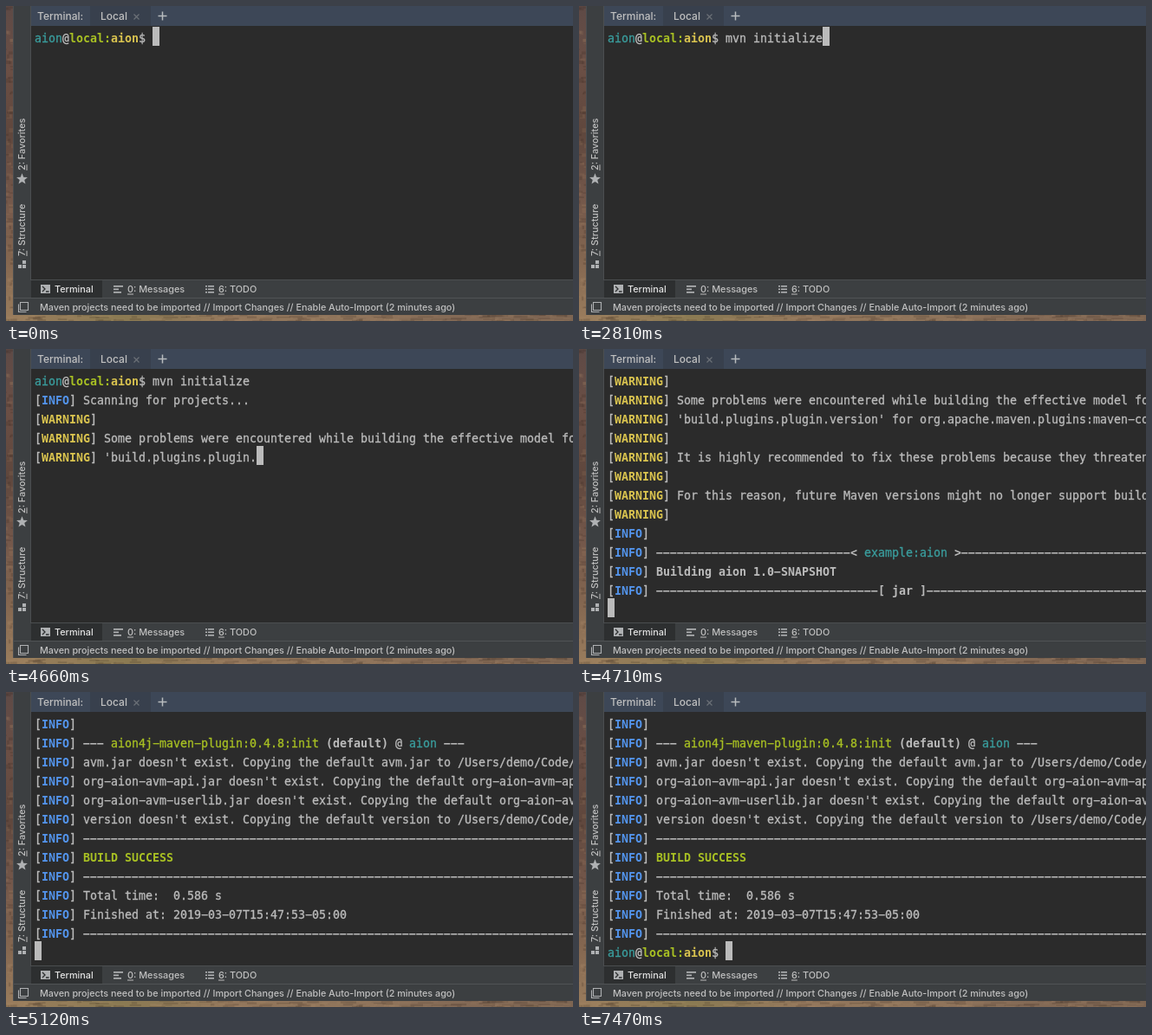
An HTML page with a canvas that plays this animation: 654 by 364 pixels, repeating every 7.57 s.

```html
<!DOCTYPE html>
<html lang="en">
<head>
<meta charset="utf-8">
<title>Terminal session</title>
<style>
html, body { margin: 0; width: 100%; height: 100%; overflow: hidden; background: #2b2b2b; }
canvas { display: block; }
</style>
</head>
<body>
<canvas id="stage" width="654" height="364"></canvas>
<script>
const W = 654, H = 364, LOOP = 7570;
const CELL = 8, ROW = 22, LEFT = 33, TOP = 24, ROWS = 13;
const UI = 'Inter, sans-serif';
const MONO = '13.29px "DejaVu Sans Mono", monospace';

// "~x" inside a line switches to style x: [colour, bold]
const STYLES = {
  n: ['#bbbbbb', false],
  s: ['#bbbbbb', true],
  t: ['#3a9d9d', false],
  g: ['#a8c023', false],
  G: ['#a8c023', true],
  y: ['#d9c34f', true],
  b: ['#5394ec', true]
};

const PROMPT = '~taion~s@~Glocal:~yaion~n$ ';
const COMMAND = PROMPT + 'mvn initialize';
const info = (text = '') => `[~bINFO~n] ${text}`;
const warn = (text = '') => `[~yWARNING~n] ${text}`;
const dashes = n => '-'.repeat(n);
const missing = (file, to = '/Users/demo/Code/') =>
  info(`${file} doesn't exist. Copying the default ${file} to ${to}`);

const LOG = [
  COMMAND,
  info('Scanning for projects...'),
  warn(),
  warn('Some problems were encountered while building the effective model for example:aion'),
  warn("'build.plugins.plugin.version' for org.apache.maven.plugins:maven-compiler-plugin"),
  warn(),
  warn('It is highly recommended to fix these problems because they threaten the stability'),
  warn(),
  warn('For this reason, future Maven versions might no longer support building such'),
  warn(),
  info(),
  info(`~s${dashes(28)}< ~texample:aion~s >${dashes(28)}`),
  info('~sBuilding aion 1.0-SNAPSHOT'),
  info(`~s${dashes(32)}[ jar ]${dashes(33)}`),
  info(),
  info('~s--- ~gaion4j-maven-plugin:0.4.8:init~s (default)~n @ ~taion~s ---'),
  missing('avm.jar'),
  missing('org-aion-avm-api.jar'),
  missing('org-aion-avm-userlib.jar'),
  missing('version'),
  info('~s' + dashes(72)),
  info('~GBUILD SUCCESS'),
  info('~s' + dashes(72)),
  info('Total time:  0.586 s'),
  info('Finished at: 2019-03-07T15:47:53-05:00'),
  info('~s' + dashes(72))
];

// Each screen: start time, finished log lines, text on the cursor line
const SCREENS = [
  [0, 0, PROMPT],
  [1790, 0, COMMAND],
  [3080, 1, ''],
  [4570, 2, ''],
  [4660, 4, warn("'build.plugins.plugin.")],
  [4680, 10, ''],
  [4710, 14, ''],
  [5010, 17, ''],
  [5060, 19, ''],
  [5120, 26, ''],
  [5150, 26, PROMPT]
];
const CURSOR_OFF = [[60, 530], [1040, 1550], [2300, 2810], [3580, 4120], [5620, 6160], [6630, 7170]];

const ctx = document.getElementById('stage').getContext('2d');
const frame = document.createElement('canvas');
frame.width = W;
frame.height = H;
drawWindow(frame.getContext('2d'));

function drawWindow(g) {
  const rect = (x, y, w, h, color) => {
    g.fillStyle = color;
    g.fillRect(x, y, w, h);
  };
  const label = (text, x, y, size, color = '#c0c0c0') => {
    g.font = `500 ${size}px ${UI}`;
    g.fillStyle = color;
    g.fillText(text, x, y);
  };
  const mnemonic = (text, x, y) => {
    label(text, x, y, 10.85);
    rect(x, y + 1.5, g.measureText(text[0]).width, 1, '#bbbbbb');
  };
  const stroke = (color, width, ...lines) => {
    g.strokeStyle = color;
    g.lineWidth = width;
    g.beginPath();
    for (const [x, y, ...rest] of lines) {
      g.moveTo(x, y);
      for (let i = 0; i < rest.length; i += 2) g.lineTo(rest[i], rest[i + 1]);
    }
    g.stroke();
  };

  drawDesktop(g, rect);

  // Panels
  rect(8, 0, W - 8, 357, '#3c3f41');
  rect(8, 0, 1, 357, '#4b4e50');
  rect(28, 0, 1, 317, '#4b4e50');
  rect(29, 0, W - 29, 23, '#3d4757');
  rect(97, 0, 70, 23, '#38404d');
  rect(29, 23, W - 29, 294, '#2b2b2b');
  rect(29, 316, W - 29, 1, '#4b4e50');
  rect(29, 317, 82, 20, '#2d2f30');
  rect(9, 337, W - 9, 1, '#505355');

  // Header
  label('Terminal:', 36, 16, 12);
  label('Local', 109, 16, 12);
  stroke('#6d7279', 1.1, [147.5, 9.5, 153.5, 15.5], [153.5, 9.5, 147.5, 15.5]);
  stroke('#b8bbbe', 1.5, [175.5, 11.5, 185.5, 11.5], [180.5, 6.5, 180.5, 16.5]);

  // Side bar
  for (const [text, y] of [['2: Favorites', 190], ['7: Structure', 289]]) {
    g.save();
    g.translate(22, y);
    g.rotate(-Math.PI / 2);
    mnemonic(text, 0, 0);
    g.restore();
  }
  g.fillStyle = '#afb1b3';
  g.beginPath();
  for (let i = 0; i < 10; i++) {
    const r = i % 2 ? 2.9 : 6.8, a = i * Math.PI / 5 - Math.PI / 2;
    g.lineTo(18.5 + r * Math.cos(a), 200 + r * Math.sin(a));
  }
  g.fill();
  rect(19, 294, 4, 4, '#afb1b3');
  rect(14, 299, 4, 4, '#afb1b3');
  rect(19, 299, 4, 4, '#afb1b3');

  // Tool buttons
  rect(40, 322, 11, 10, '#afb1b3');
  stroke('#2d2f30', 1.3, [42, 324, 45, 327, 42, 330], [46, 330, 49.5, 330]);
  label('Terminal', 56, 331, 10.85, '#e4e4e4');
  [11, 6, 9].forEach((w, i) => rect(124, 323 + i * 3.5, w, 1.7, '#afb1b3'));
  mnemonic('0: Messages', 140, 331);
  for (let y = 323; y < 333; y += 3.5) {
    rect(230, y, 2, 1.6, '#afb1b3');
    rect(233, y, 7, 1.6, '#afb1b3');
  }
  mnemonic('6: TODO', 245, 331);

  // Status bar
  stroke('#afb1b3', 1.1, [16.5, 342.5, 25.5, 342.5, 25.5, 351.5, 16.5, 351.5, 16.5, 342],
    [14.5, 344.5, 14.5, 353.5, 23.5, 353.5]);
  label('Maven projects need to be imported // Import Changes // Enable Auto-Import (2 minutes ago)',
    39, 352, 10.77);
}

function drawDesktop(g, rect) {
  let seed = 7;
  const random = () => (seed = seed * 16807 % 2147483647) / 2147483647;
  const gradient = (x, y, colors) => {
    const fill = g.createLinearGradient(0, 0, x, y);
    colors.forEach((color, i) => fill.addColorStop(i / (colors.length - 1), color));
    return fill;
  };
  rect(0, 0, W, H, gradient(0, H, ['#5e4a46', '#6b4f45', '#5f473d', '#73574a', '#836650', '#9a7d5d']));
  rect(8, 357, W - 8, 7, gradient(W, 0, ['#9a7d5d', '#8a7a52', '#93775c', '#8d735a', '#846a56', '#7d6552']));
  const speck = (x, y, w, h) =>
    rect(x, y, w, h, random() < 0.5 ? 'rgba(40,28,22,.16)' : 'rgba(175,140,110,.14)');
  for (let i = 0; i < 90; i++) speck(random() * 8 - 2, random() * H, 2 + random() * 6, 1 + random() * 4);
  for (let i = 0; i < 170; i++) speck(random() * W, 356 + random() * 8, 4 + random() * 16, 1 + random() * 2);
}

// Draws one terminal line on the cell grid and returns its length in cells
function drawLine(line, row) {
  let column = 0;
  line.split('~').forEach((part, i) => {
    const [color, bold] = STYLES[i ? part[0] : 'n'];
    ctx.fillStyle = ctx.strokeStyle = color;
    ctx.lineWidth = 0.3;
    ctx.font = (bold ? 'bold ' : '') + MONO;
    for (const char of i ? part.slice(1) : part) {
      // The terminal face has a wide hyphen and slightly heavy regular strokes
      const glyph = [char === '-' ? '\u2212' : char, LEFT + column * CELL, TOP + row * ROW + 18];
      ctx.fillText(...glyph);
      if (!bold) ctx.strokeText(...glyph);
      column++;
    }
  });
  return column;
}

function draw(time) {
  ctx.drawImage(frame, 0, 0);
  const [, done, current] = SCREENS.filter(([at]) => at <= time).pop();
  const lines = [...LOG.slice(0, done), current].slice(-ROWS);
  let column = 0;
  lines.forEach((line, row) => { column = drawLine(line, row); });
  if (!CURSOR_OFF.some(([from, to]) => time >= from && time < to)) {
    ctx.fillStyle = '#bbbbbb';
    ctx.fillRect(LEFT + column * CELL, TOP + (lines.length - 1) * ROW, CELL, ROW);
  }
}

const start = performance.now();
function tick() {
  draw((performance.now() - start) % LOOP);
  requestAnimationFrame(tick);
}
tick();
</script>
</body>
</html>
```
